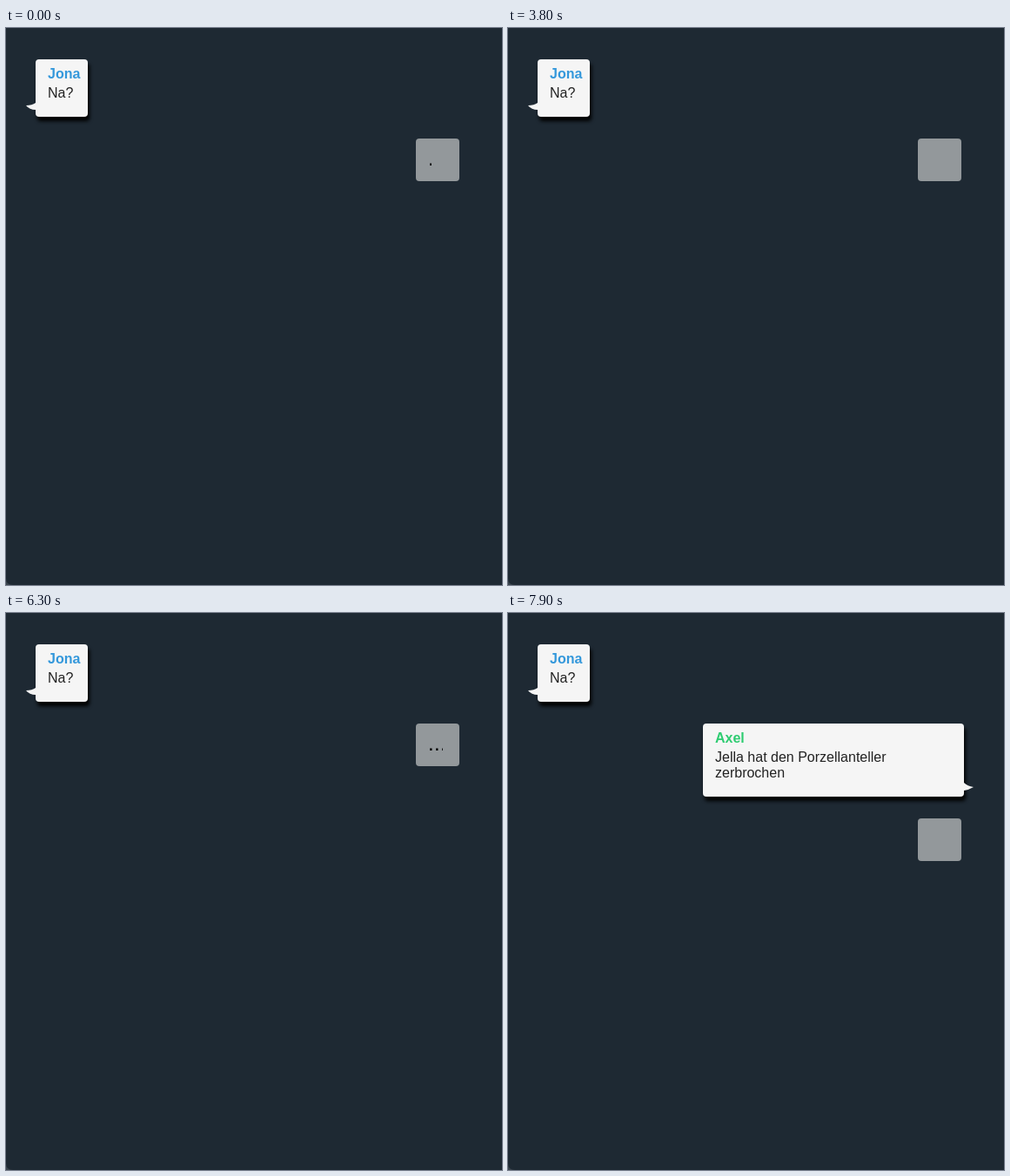
Animation of 570 by 640 pixels, one loop 8000 ms. Source, as an HTML page:

```html
<!DOCTYPE html>
<html lang="de">
<head>
<meta charset="utf-8">
<title>Chat</title>
<style>
  html, body { margin: 0; width: 100%; height: 100%; overflow: hidden; background: #3b454e; }
  svg { display: block; width: 570px; height: 640px; font: 16px "Liberation Sans", Arial, sans-serif; }
  .bubble { fill: #f5f5f5; }
  .shadow { fill: #000; filter: blur(2px); }
  .name { font-weight: bold; }
  .msg { fill: #222; }
  .dots { font-size: 24px; fill: #000; }
</style>
</head>
<body>
<svg viewBox="0 0 570 640">
  <defs>
    <clipPath id="reveal"><rect id="wipe" x="484.5" y="127" width="0" height="49"/></clipPath>
  </defs>

  <path d="M0 0H570V640H8Q0 640 0 632Z" fill="#1e2933"/>

  <g>
    <rect class="shadow" x="36" y="41" width="60" height="66" rx="4"/>
    <rect class="bubble" x="34" y="36" width="60" height="66" rx="4"/>
    <path class="bubble" d="M34 86Q30 89 23 89Q27 94 34 94Z"/>
    <text class="name" x="48" y="58" fill="#3498db">Jona</text>
    <text class="msg" x="48" y="80">Na?</text>
  </g>

  <g id="reply" opacity="0">
    <rect class="shadow" x="226" y="132" width="300" height="84" rx="4"/>
    <rect class="bubble" x="224" y="127" width="300" height="84" rx="4"/>
    <path class="bubble" d="M524 195Q528 199 535 200Q530 203 524 204Z"/>
    <text class="name" x="238" y="149" fill="#2ecc71">Axel</text>
    <text class="msg" x="238" y="171">Jella hat den Porzellanteller</text>
    <text class="msg" x="238" y="189">zerbrochen</text>
  </g>

  <g id="typing">
    <rect x="471" y="127" width="50" height="49" rx="4" fill="#93989b"/>
    <g clip-path="url(#reveal)">
      <text class="dots" x="485 492 499" y="158">...</text>
    </g>
  </g>
</svg>
<script>
  const LOOP = 8000, TICK = 100, REPLY_AT = 7000;
  const CYCLE = 1360, LEAD = 290, SPEED = 0.0152; // ms, ms, px per ms

  // Plays a style computed once per tick, held until the next one.
  function play(id, styleAt) {
    const count = LOOP / TICK;
    const frames = Array.from({ length: count + 1 }, (_, i) => ({
      offset: i / count,
      easing: "steps(1, end)",
      ...styleAt(Math.min(i, count - 1) * TICK)
    }));
    const anim = document.getElementById(id).animate(frames, { duration: LOOP, iterations: Infinity });
    anim.startTime = document.timeline.currentTime;
  }

  play("wipe", t => ({ width: ((t + LEAD) % CYCLE * SPEED).toFixed(2) + "px" }));
  play("reply", t => ({ opacity: t < REPLY_AT ? 0 : 1 }));
  play("typing", t => ({ transform: `translateY(${t < REPLY_AT ? 0 : 109}px)` }));
</script>
</body>
</html>
```
